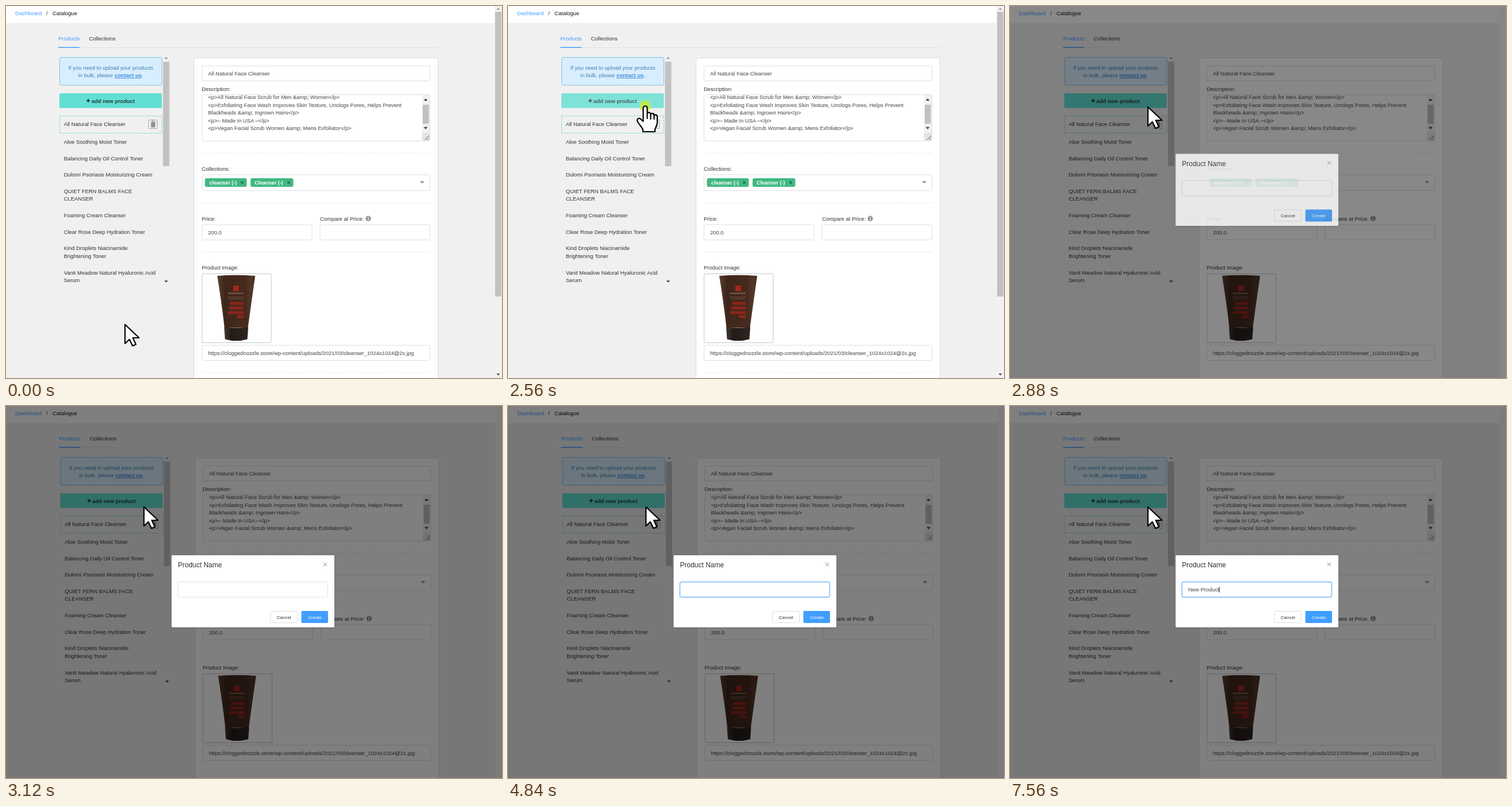
Write an HTML page that moves like this. It is 864 by 648 pixels and loops after 8 s.

```html
<!DOCTYPE html>
<html lang="en">
<head>
<meta charset="utf-8">
<title>Catalogue</title>
<style>
html, body { margin: 0; width: 100%; height: 100%; overflow: hidden; background: #f0f0f0; }
svg { display: block; width: 864px; height: 648px; }
text { font: 9.45px "Liberation Sans", Arial, sans-serif; fill: #303133; white-space: pre; }
.bold { font-weight: 700; }
.blue { fill: #409eff; }
.note { fill: #427fae; }
.value { fill: #606266; stroke: #606266; stroke-width: .15px; }
.tag text { font-size: 9px; font-weight: 700; fill: #fff; }
.tag rect { fill: #41b883; }
.tag path { stroke: #1d5f42; stroke-width: 1.1; }
.field { fill: #fff; stroke: #dcdfe6; }
.rule { stroke: #e4e7ed; stroke-dasharray: 3 2; }
.track { fill: #f1f1f1; }
.thumb { fill: #c1c1c1; }
.small { font-size: 8px; }
.cursor { fill: #fff; stroke: #000; stroke-width: 2.2; stroke-linejoin: round; stroke-linecap: round; }
</style>
</head>
<body>
<svg viewBox="0 0 864 648">
  <defs>
    <linearGradient id="tube">
      <stop offset="0" stop-color="#5a4030"/><stop offset=".2" stop-color="#3f261b"/>
      <stop offset=".75" stop-color="#462a1d"/><stop offset=".9" stop-color="#54392b"/><stop offset="1" stop-color="#40291f"/>
    </linearGradient>
    <linearGradient id="cap">
      <stop offset="0" stop-color="#443630"/><stop offset=".3" stop-color="#221b18"/><stop offset="1" stop-color="#2f2522"/>
    </linearGradient>
    <filter id="shadow" x="-10%" y="-10%" width="120%" height="125%">
      <feDropShadow dx="0" dy="1" stdDeviation="1.5" flood-opacity=".18"/>
    </filter>
  </defs>

  <rect width="864" height="648" fill="#f0f0f0"/>
  <rect width="853" height="29.5" fill="#fff"/>
  <text x="16" y="16.3" class="blue">Dashboard</text>
  <text x="70" y="16.3">/</text>
  <text x="81" y="16.3" style="fill:#111">Catalogue</text>

  <g id="content">
    <text x="91.3" y="60" class="blue">Products</text>
    <text x="144.5" y="60">Collections</text>
    <path d="M91 72.5H755" stroke="#dfe2e8"/>
    <path d="M91 72.3H128" stroke="#409eff" stroke-width="1.6"/>

    <rect x="93.5" y="89.5" width="178" height="48.5" rx="2.5" fill="#d8eefe" stroke="#4f9fcb" stroke-dasharray="1.5 1"/>
    <text x="108.5" y="110.6" class="note">If you need to upload your products</text>
    <text x="126" y="124.2" class="note">in bulk, please <tspan class="bold" fill="#3d8ae0" text-decoration="underline">contact us</tspan>.</text>

    <g id="add">
      <rect x="93" y="152" width="178.5" height="25.7" rx="2" fill="#62dfd3"/>
      <path d="M140.2 164.8H146.4M143.3 161.7V167.9" stroke="#16302e" stroke-width="1.7"/>
      <text x="149" y="168.7" class="bold" style="fill:#20403d">add new product</text>
    </g>

    <rect x="93.5" y="191.5" width="178" height="30" fill="none" stroke="#6fd3b2" stroke-dasharray="3 2"/>
    <rect x="248.5" y="198.5" width="15" height="15" rx="1.5" fill="#f3f3f3" stroke="#a8a8a8"/>
    <path d="M252 201.7H260.5M254.5 201V200.5H258V201M253 203H259.5V211H253Z" fill="#909090" stroke="#909090"/>
    <g id="list"></g>

    <rect x="273" y="85" width="12" height="402" class="track" opacity=".5"/>
    <rect x="273.5" y="97" width="11" height="182" class="thumb"/>
    <path d="M275.7 92L279 88.7L282.3 92Z" fill="#999"/>
    <path d="M275.7 478.3L279 481.8L282.3 478.3Z" fill="#444"/>

    <rect x="327.5" y="90.5" width="425" height="570" rx="5" fill="#fff" stroke="#d9dbe0"/>
    <rect x="341.5" y="104.5" width="397" height="26" rx="2.5" class="field"/>
    <text x="352" y="120.9" class="value">All Natural Face Cleanser</text>

    <text x="341" y="147.9">Description:</text>
    <rect x="341.5" y="154.5" width="397" height="80.5" rx="2.5" class="field"/>
    <g id="description"></g>
    <rect x="725" y="155" width="13" height="79.5" class="track"/>
    <rect x="726" y="172" width="10.5" height="33" class="thumb"/>
    <path d="M727.5 165L731 161L734.5 165ZM727.5 210.8L731 214.8L734.5 210.8Z" fill="#444"/>
    <rect x="724.5" y="221" width="13.5" height="13.5" fill="#e4e4e4"/>
    <path d="M729.5 233.5L737 226M734 233.5L737 230.5" stroke="#555"/>

    <path class="rule" d="M341 256.5H739M341 343H739M341 428.5H739M341 638.5H739"/>

    <text x="341" y="287.3">Collections:</text>
    <rect x="341.5" y="294" width="397" height="27.5" rx="2.5" class="field"/>
    <g class="tag">
      <rect x="346.5" y="300" width="73" height="15" rx="3"/>
      <text x="354" y="310.7">cleanser (-)</text>
      <path d="M409.5 305.5l4 4m0-4l-4 4"/>
    </g>
    <g class="tag">
      <rect x="426" y="300" width="74.5" height="15" rx="3"/>
      <text x="433" y="310.7">Cleanser (-)</text>
      <path d="M490.5 305.5l4 4m0-4l-4 4"/>
    </g>
    <path d="M721 305H729L725 309.3Z" fill="#999"/>

    <text x="341" y="373.8">Price:</text>
    <rect x="341.5" y="381" width="191.5" height="26.5" rx="2.5" class="field"/>
    <text x="352" y="397.6" class="value">200.0</text>
    <text x="547" y="373.8">Compare at Price:</text>
    <circle cx="631" cy="370.2" r="4.6" fill="#929292"/>
    <path d="M631 367v1.5M631 369.5v3.5" stroke="#fff" stroke-width="1.5"/>
    <rect x="547" y="381" width="191.5" height="26.5" rx="2.5" class="field"/>

    <text x="341" y="459.4">Product Image:</text>
    <rect x="341.5" y="466.5" width="120.5" height="120" rx="1.5" fill="#fff" stroke="#c6c8cc"/>
    <path d="M368 470Q401 467.5 434 470Q427 520 421.5 560H380.5Q376 520 368 470Z" fill="url(#tube)"/>
    <path d="M380 559.5Q401 561.5 422 559.5L420.5 580.5Q401 586 381.5 580.5Z" fill="url(#cap)"/>
    <rect x="396" y="487" width="9.5" height="9.5" fill="#a8261d"/>
    <path d="M391 518H414M389 526H413M387 534H415M403 541H414" stroke="#c3261d" stroke-width="5" stroke-dasharray="2 .8" opacity=".8"/>
    <path d="M387 500.500H414" stroke="#b99f8b" stroke-width="2" stroke-dasharray="2 1" opacity=".7"/>
    <path d="M386 507H414M388 510H413" stroke="#8d6f5c" opacity=".6"/>
    <rect x="341.5" y="591" width="397" height="26.5" rx="2.5" class="field"/>
    <text x="352" y="607.6" class="value">https://cloggednozzle.store/wp-content/uploads/2021/03/cleanser_1024x1024@2x.jpg</text>
  </g>

  <g id="scrollbar">
    <rect x="851" width="13" height="648" class="track"/>
    <rect x="852" y="10" width="11" height="496" class="thumb"/>
    <path d="M854.5 6.5L857.5 3L860.5 6.5Z" fill="#999"/>
    <path d="M854.5 640.3L857.5 643.8L860.5 640.3Z" fill="#444"/>
  </g>
  <rect id="gutter" x="853" width="11" height="648" fill="#fafafa"/>

  <rect id="shade" width="864" height="648"/>

  <g id="dialog">
    <rect x="288.5" y="260" width="283.5" height="125.5" rx="1.5" fill="#fff" filter="url(#shadow)"/>
    <text x="299.5" y="281.2" style="font-size:12px">Product Name</text>
    <path d="M552.7 272.7l6.6 6.6m0-6.6l-6.6 6.6" stroke="#909399"/>
    <rect x="299.5" y="306.5" width="261" height="26.5" rx="2.5" class="field"/>
    <rect id="focus" x="299.5" y="306.5" width="261" height="26.5" rx="2.5" fill="none" stroke="#409eff"/>
    <text id="typed" x="310.4" y="323.3" class="value"></text>
    <rect id="caret" y="315" width="1" height="10" fill="#333"/>
    <rect x="460.5" y="357.5" width="47" height="20" rx="2" class="field"/>
    <text x="484.2" y="370.5" class="small" text-anchor="middle">Cancel</text>
    <rect x="514.5" y="357" width="46.5" height="21" rx="2" fill="#409eff"/>
    <text x="538" y="370.5" class="small" text-anchor="middle" style="fill:#fff">Create</text>
  </g>

  <circle id="click" cx="239" cy="174" r="10" fill="#d0ec2c" opacity=".75"/>
  <path id="arrow" class="cursor" d="M1.3 1.8V35L9 27.8L14.5 39L20.3 36.6L15 25H25.8Z"/>
  <path id="hand" class="cursor" d="M-3.5 4C-3.5 -1 3.5 -1 3.5 4V14C4.5 10 9.5 11 9.5 15C10.5 12 15.5 12.5 15.5 17C16.5 14.5 21 15 21 19V29C21 34 18 37 17 41V45H-4V41C-6 37 -9 34 -13 28C-16 23 -11 20 -8 23L-3.5 27ZM3.5 14V22M9.5 15V23M15.5 17V23"/>
</svg>
<script>
const $ = id => document.getElementById(id);
const LOOP = 8000;

function addLines(id, x, lines, className) {
  for (const [y, content] of lines) {
    const line = document.createElementNS('http://www.w3.org/2000/svg', 'text');
    line.setAttribute('x', x);
    line.setAttribute('y', y);
    line.setAttribute('class', className);
    line.textContent = content;
    $(id).append(line);
  }
}

addLines('list', 100.7, [
  [208.5, 'All Natural Face Cleanser'],
  [240, 'Aloe Soothing Moist Toner'],
  [268.5, 'Balancing Daily Oil Control Toner'],
  [297.2, 'Dulomi Psoriasis Moisturizing Cream'],
  [325.8, 'QUIET FERN BALMS FACE'],
  [339.3, 'CLEANSER'],
  [368, 'Foaming Cream Cleanser'],
  [396.7, 'Clear Rose Deep Hydration Toner'],
  [425.4, 'Kind Droplets Niacinamide'],
  [438.9, 'Brightening Toner'],
  [467.6, 'Vanit Meadow Natural Hyaluronic Acid'],
  [481.1, 'Serum']
], '');
addLines('description', 352, [
  [162.2, '<p>All Natural Face Scrub for Men &amp; Women</p>'],
  [175.7, '<p>Exfoliating Face Wash Improves Skin Texture, Unclogs Pores, Helps Prevent'],
  [189.2, 'Blackheads &amp; Ingrown Hairs</p>'],
  [202.7, '<p>– Made In USA –</p>'],
  [216.2, '<p>Vegan Facial Scrub Women &amp; Mens Exfoliator</p>']
], 'value');

// Value of the last [time, value] pair already reached.
const stepAt = (t, first, steps) => steps.reduce((v, [at, next]) => t >= at ? next : v, first);

const NAME = 'New Product';
const keyTimes = [5040, 5160, 5240, 5360, 5600, 5720, 5920, 6040, 6160, 6240, 6440];

function pointerAt(t) {
  if (t < 1000) return [206, 553];
  if (t < 1160) return [218, 547];
  const step = Math.min(7, Math.floor((t - 1160) / 93.3) + 1);
  const u = 1 - (1 - step / 7) ** 1.7, v = 1 - u;
  return [v * v * 218 + 2 * u * v * 322 + u * u * 239, v * v * 547 + 2 * u * v * 340 + u * u * 174];
}

const show = (id, on) => { $(id).style.display = on ? '' : 'none'; };
const fade = (id, value) => { $(id).style.opacity = value; };

function render(t) {
  const modal = t >= 2760;
  $('content').setAttribute('transform', `translate(${modal ? 1.5 : 0})`);
  show('scrollbar', !modal);
  show('gutter', modal);
  fade('shade', stepAt(t, 0, [[2760, .1], [2880, .465], [3000, .5]]));

  const opening = stepAt(t, 0, [[2760, .1], [2880, .81], [3000, .99], [3120, 1]]);
  fade('dialog', opening);
  $('dialog').setAttribute('transform', `translate(0 ${-13.3 * (1 - opening)})`);
  fade('focus', stepAt(t, 0, [[3320, .35], [3440, .85], [3520, 1]]));

  const [x, y] = pointerAt(t);
  const pointing = !modal && x < 272 && y < 485;
  for (const id of ['arrow', 'hand']) $(id).setAttribute('transform', `translate(${x} ${y})`);
  show('arrow', !pointing);
  show('hand', pointing);
  show('click', t >= 2560 && !modal);
  fade('add', pointing && y < 178 ? .8 : t >= 2760 && t < 2880 ? .87 : 1);

  $('typed').textContent = NAME.slice(0, keyTimes.filter(at => t >= at).length);
  const end = $('typed').textContent ? $('typed').getComputedTextLength() : 0;
  $('caret').setAttribute('x', Math.round(310 + end));
  show('caret', stepAt(t, false, [[3320, true], [3840, false], [4400, true], [4840, false],
    [5040, true], [6960, false], [7560, true]]));
}

const start = performance.now();
function tick() {
  render((performance.now() - start) % LOOP);
  requestAnimationFrame(tick);
}
tick();
</script>
</body>
</html>
```
